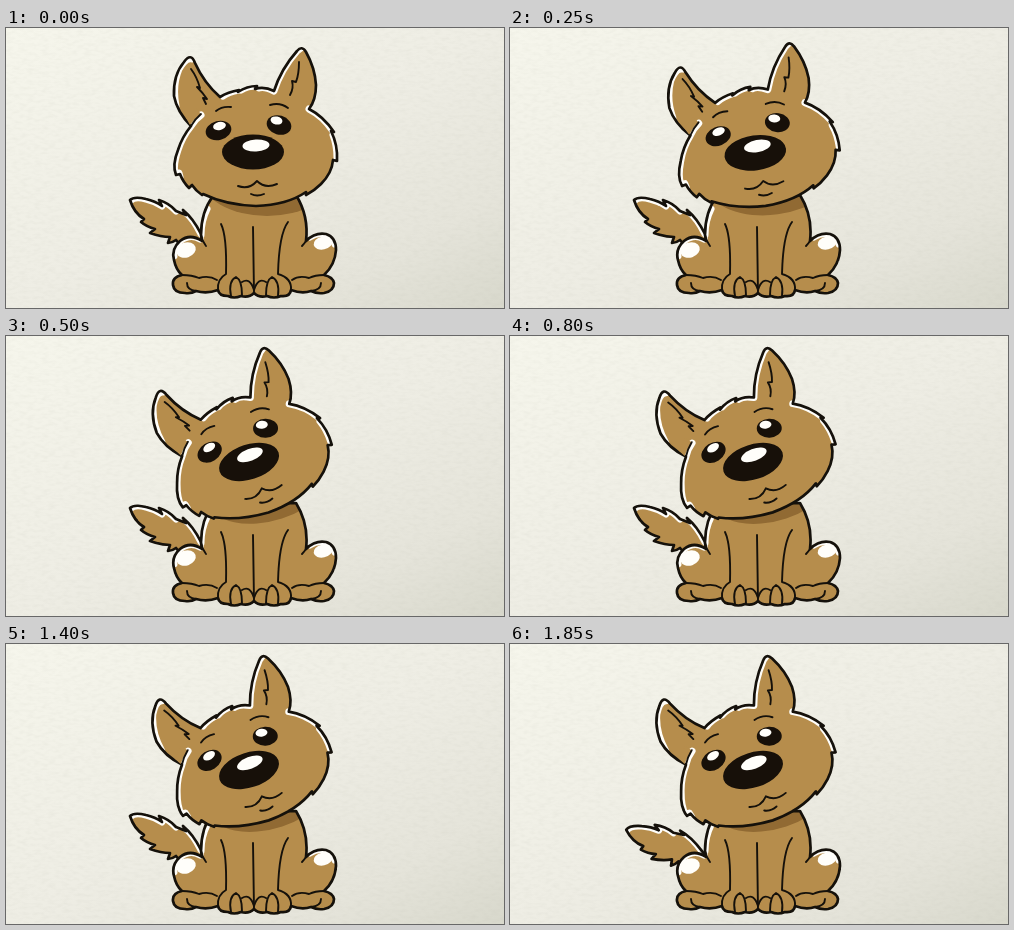
An HTML page for the animation above (1900 ms loop, 498 px wide and 280 px high).

```html
<!DOCTYPE html>
<html lang="en">
<head>
<meta charset="utf-8">
<title>Sitting puppy</title>
<style>
  html, body { margin: 0; width: 100%; height: 100%; overflow: hidden; background: #ecebe2; }
  svg { position: absolute; left: 0; top: 0; width: 100%; height: 100%; display: block; }
  .fur { fill: #b68d4c; }
  .ink { fill: none; stroke: #15110b; stroke-width: 2.7; stroke-linejoin: round; stroke-linecap: round; }
  .thin { stroke-width: 1.9; }
  .rim { fill: none; stroke: #fffefa; stroke-width: 7; stroke-linecap: round; stroke-linejoin: round; }
  .dark { fill: #171009; }
  .glow { fill: #fffefa; }
  .shade { fill: #916a33; }
</style>
</head>
<body>
<svg viewBox="0 0 498 280" preserveAspectRatio="none">
  <defs>
    <linearGradient id="light" x1="0" y1="0" x2="1" y2="1">
      <stop offset="0" stop-color="#f6f6ec"/>
      <stop offset=".5" stop-color="#eeede4"/>
      <stop offset=".8" stop-color="#e5e4da"/>
      <stop offset="1" stop-color="#d8d8cc"/>
    </linearGradient>
    <filter id="grain" x="0" y="0" width="100%" height="100%">
      <feTurbulence type="fractalNoise" baseFrequency=".14 .32" numOctaves="2" seed="7"/>
      <feColorMatrix values="0 0 0 0 .45  0 0 0 0 .45  0 0 0 0 .38  .2 0 0 0 -.08"/>
    </filter>
  </defs>
  <rect width="498" height="280" fill="url(#light)"/>
  <rect width="498" height="280" filter="url(#grain)"/>
</svg>

<svg viewBox="0 0 498 280" preserveAspectRatio="none">
  <defs>
    <path id="tailShape" d="M124 172 Q128 168 140 171 Q149 173 156 178 L153 172 Q163 175 170 183 L180 187 L177 182 Q187 190 195 206 L204 224 L186 224
      Q176 220 170 212 Q166 215 162 215 L164 209 Q155 209 144 205 L149 201 Q141 199 135 194 L138 191 Q128 185 124 172 Z"/>
    <path id="bodyShape" d="M207 168 Q195 184 195 207 L196 213 Q184 205 174 213 Q165 221 168 232 Q170 242 176 247
      Q166 249 167 257 Q168 265 179 265 Q185 266 190 263 Q201 266 212 262 Q213 268 222 268 Q228 271 235 268 Q243 270 248 265
      Q253 270 261 268 Q268 271 275 268 Q284 269 285 262 Q296 266 305 263 Q311 266 318 265 Q328 263 328 255 Q327 249 318 247 Q329 237 330 222 Q330 209 320 206 Q309 204 300 213
      Q303 188 290 167 Z"/>
    <path id="headShape" d="M185 98 Q171 84 168 68 Q167 47 178 34 Q185 24 189 35 Q198 55 214 69 Q222 64 233 62 L232 64 Q241 58 251 58 L249 61 Q258 58 268 63
      Q275 41 291 23 Q296 17 300 24 Q309 40 310 57 Q310 72 303 81 Q317 88 328 104 L325 103 Q332 117 331 133 L327 132
      Q326 145 315 156 Q308 163 300 167 L300 164 Q281 177 250 178 Q220 177 197 166 L196 167 Q190 163 186 157 L183 160 Q177 154 174 146 L170 147 Q166 137 172 122 Q176 109 185 98 Z"/>
    <clipPath id="tailClip"><use href="#tailShape"/></clipPath>
    <clipPath id="bodyClip"><use href="#bodyShape"/></clipPath>
    <clipPath id="headClip"><use href="#headShape"/></clipPath>
  </defs>

  <g id="tail">
    <use href="#tailShape" class="fur"/>
    <path class="rim" clip-path="url(#tailClip)" d="M124 173 Q128 168 140 171 Q149 173 156 178 M155 173 Q163 175 170 183 M179 184 Q187 190 195 206"/>
    <use href="#tailShape" class="ink"/>
  </g>

  <use href="#bodyShape" class="fur"/>
  <g clip-path="url(#bodyClip)">
    <g id="shadow"><ellipse class="shade" cx="261" cy="150" rx="66" ry="38"/></g>
    <path class="rim" d="M201 181 Q195 193 195 207 M194 211 Q184 205 174 213 Q167 219 168 228 M304 209 Q311 204 320 206 Q328 208 329 216"/>
    <ellipse class="glow" cx="180" cy="222" rx="10" ry="7.5" transform="rotate(-18 180 222)"/>
    <ellipse class="glow" cx="317" cy="215" rx="9.5" ry="6.5" transform="rotate(-12 317 215)"/>
  </g>
  <use href="#bodyShape" class="ink"/>
  <g class="ink thin">
    <path d="M195 207 Q196 213 200 218 M300 213 Q298 216 296 218"/>
    <path d="M215 196 Q221 208 220 246 Q211 251 212 262 M247 199 L248 265 M282 194 Q273 206 272 246 Q286 250 285 262"/>
    <path d="M225 268 Q222 253 230 249 Q236 252 236 267 M236 254 Q244 249 248 262 M272 268 Q274 253 266 249 Q260 252 260 267 M260 254 Q252 249 248 262"/>
    <path d="M176 247 Q186 247 193 250 Q203 247 211 252 M318 247 Q309 247 303 250 Q293 247 286 252 M190 263 Q181 262 181 255 M305 263 Q315 262 315 255"/>
  </g>

  <g id="head">
    <use href="#headShape" class="fur"/>
    <g clip-path="url(#headClip)">
      <path class="rim" d="M170 78 Q166 58 173 41 Q180 29 186 31 M217 68 Q222 64 233 62 M235 62 Q241 58 251 58 M253 60 Q258 58 268 63 Q275 41 291 23 L295 20
        M303 81 Q317 88 327 103 M327 107 Q331 117 331 130 M174 149 L173 145 M169 145 Q167 137 172 122 Q176 109 185 98 Q189 91 195 87"/>
    </g>
    <use href="#headShape" class="ink"/>
    <path class="fur" d="M184 97 Q188 91 195 86 L190 80 L180 90 Z"/>
    <g class="ink thin">
      <path d="M185 98 Q189 91 195 86"/>
      <path d="M185 41 Q191 49 194 60 L191 59 Q197 65 201 71 L197 70 L200 76"/>
      <path d="M293 34 Q293 46 290 54 L286 53 Q288 60 284 67"/>
      <path d="M210 83 Q216 78 225 79 M264 77 Q274 74 282 80"/>
      <path d="M232 158 Q243 162 251 153 Q259 161 271 156 M245 166 Q251 169 258 166"/>
    </g>
    <ellipse class="dark" cx="212.500" cy="102.500" rx="13" ry="9.500" transform="rotate(-14 212.500 102.500)"/>
    <ellipse class="glow" cx="213.500" cy="98" rx="6.500" ry="4" transform="rotate(-14 213.500 98)"/>
    <ellipse class="dark" cx="273" cy="97" rx="12.500" ry="9.500" transform="rotate(16 273 97)"/>
    <ellipse class="glow" cx="270.500" cy="92.500" rx="6" ry="4" transform="rotate(12 270.500 92.500)"/>
    <ellipse class="dark" cx="247" cy="124" rx="31" ry="17.500"/>
    <ellipse class="glow" cx="250" cy="117.500" rx="13.500" ry="6" transform="rotate(-3 250 117.500)"/>
  </g>
</svg>

<script>
  const LOOP = 1900, STEP = 50;
  const [head, shadow, tail] = ["head", "shadow", "tail"].map(id => document.getElementById(id));
  const ease = x => (1 - Math.cos(Math.PI * Math.min(1, Math.max(0, x)))) / 2;

  // Tail turning points: time, amount lowered
  const wag = [[0, 0], [1050, 0], [1200, 1], [1400, 0], [1600, 1], [1780, 0], [1960, 1]];

  function lowered(t) {
    const i = wag.findIndex(([time]) => time > t);
    const [t0, a] = wag[i - 1], [t1, b] = wag[i];
    return a + (b - a) * ease((t - t0) / (t1 - t0));
  }

  function draw() {
    const t = Math.floor(performance.now() % LOOP / STEP) * STEP;
    const k = ease(t / 550);
    const tilt = `translate(${-4 * k} ${2 * k}) rotate(${-18.2 * k} 247 124)`;
    head.setAttribute("transform", tilt);
    shadow.setAttribute("transform", tilt);
    tail.setAttribute("transform", `rotate(${-30 * lowered(t)} 200 224)`);
    requestAnimationFrame(draw);
  }
  draw();
</script>
</body>
</html>
```
